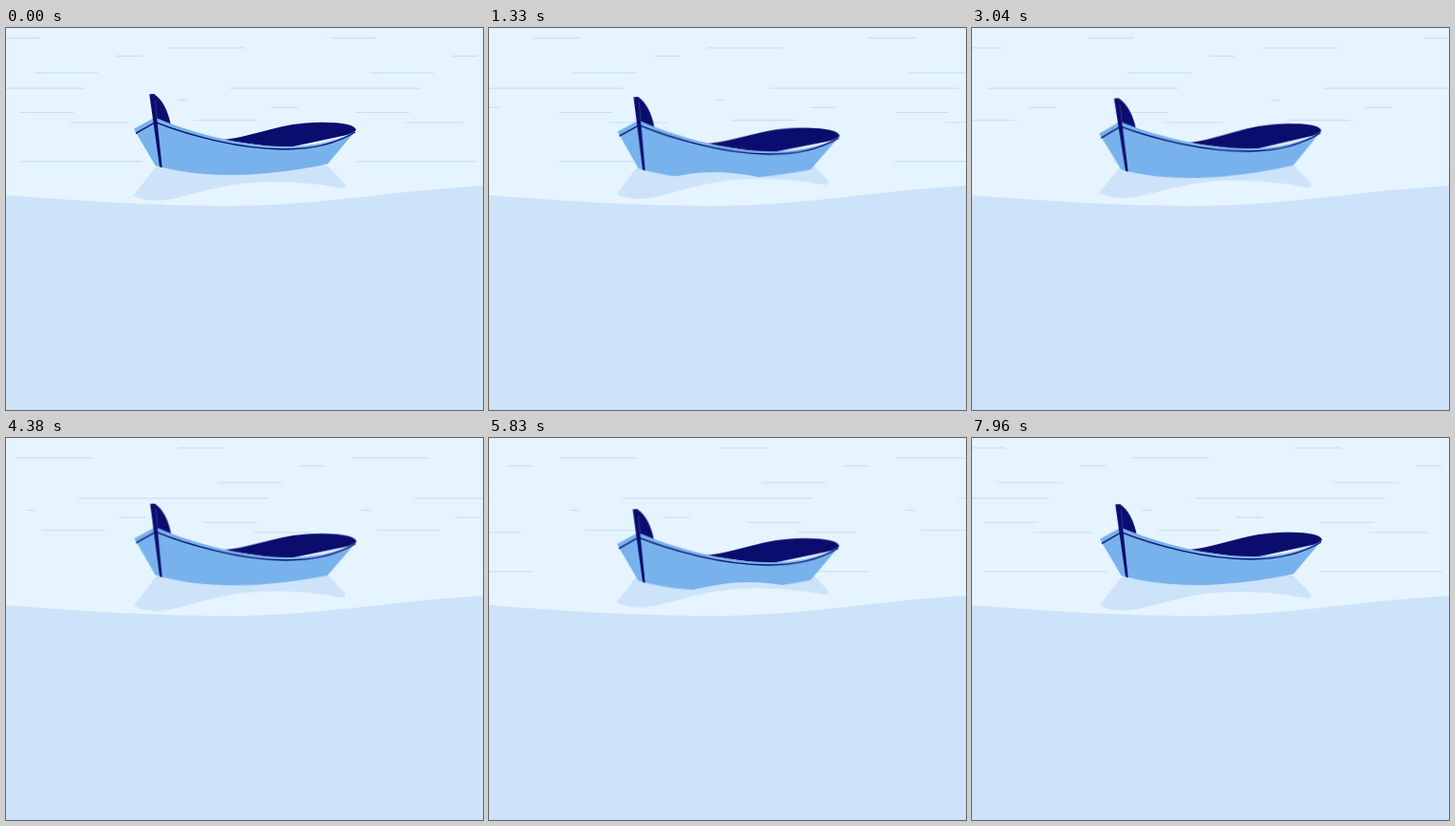
These frames come from a looping animation (500x400 px, 8 s). An HTML page:

```html
<!DOCTYPE html>
<html lang="en">
<head>
<meta charset="utf-8">
<title>Boat on calm water</title>
<style>
  html, body { margin: 0; width: 100%; height: 100%; overflow: hidden; background: #e6f4ff; }
  svg { display: block; width: 500px; height: 400px; }

  .ripples { fill: none; stroke: #c5e1f7; stroke-width: 1.2; animation: drift 8s linear infinite; }
  .swell { animation: roll 4s linear infinite; }

  /* Alternating sine-like easing; the tilt runs a quarter cycle ahead. */
  .bob, .tilt { animation: bob 2s cubic-bezier(.3642, 0, .6358, 1) infinite alternate; }
  .tilt { animation-name: tilt; animation-delay: -1s; transform-origin: 250px 150px; }
  .boat { --dy: 6px; --angle: 1deg; }
  .reflection { --dy: -3.6px; --angle: -.6deg; }

  .water { fill: #cde3fa; }
  .hull { fill: #78b2ec; }
  .navy { fill: #0a0d6e; }
  .trim { fill: none; stroke: #0a0d6e; stroke-width: 1.4; }
  .seam { fill: none; stroke: #78b2ec; stroke-width: .5; opacity: .5; }

  @keyframes drift { to { transform: translateX(352px); } }
  @keyframes roll { to { transform: translateX(288px); } }
  @keyframes bob { to { transform: translateY(var(--dy)); } }
  @keyframes tilt {
    from { transform: rotate(calc(var(--angle) * -1)); }
    to { transform: rotate(var(--angle)); }
  }
</style>
</head>
<body>
<svg viewBox="0 0 500 400">
  <defs>
    <path id="tile" d="M-12 10.4h48 M170 20.8h80 M115 29.3h27 M29 46.8h67 M-117 63.2h199
      M180 75.6h9 M278 83.1h28 M14.500 88.500h56.500 M196.500 96.600h66 M66.500 99h62 M14.500 139.800h128"/>
    <!-- Everything above the swell; its crest hides the bottom of the hull -->
    <clipPath id="above">
      <path class="swell" d="M-435 151c52 0 92 22 144 22s92-22 144-22s92 22 144 22
        s92-22 144-22s92 22 144 22s92-22 144-22V0H-435Z"/>
    </clipPath>
  </defs>

  <rect width="500" height="400" fill="#e6f4ff"/>

  <g class="ripples">
    <use href="#tile" x="-352"/>
    <use href="#tile"/>
    <use href="#tile" x="352"/>
  </g>

  <g class="reflection bob">
    <path class="water tilt" d="M158 144L133.500 175.500Q145 181.500 162 180.800C190 178 225 161 277 161
      C315 161 338 165 352 168Q358 166.500 355 163L337 144Z"/>
  </g>

  <g clip-path="url(#above)">
    <g class="boat bob">
      <g class="tilt">
        <path class="navy" d="M155 69C164 75 170 87 172.600 101L157 96Z"/>
        <path class="navy" d="M226 117.300C265 113 286 99 330 98.800C352 98.500 365 101.500 366.800 106
          C367 108 365 109.500 362 111L292 126Z"/>
        <path class="hull" d="M134 105.700L156 93.500C190 108 245 124 292 124C325 124 348 118 366.500 107.500
          L337 142.500C300 150 265 154 237 154C205 154 180 150.500 156.500 144Z"/>
        <path class="trim" d="M136 110.300L156.500 98.700C190 112 245 127 292 127C325 127 348 120 366 109"/>
        <path class="navy" d="M150.300 69.500Q153 68.700 155.500 69.200L163.700 146.200L161 145.200Z"/>
        <path class="seam" d="M156.300 75L158.300 94"/>
      </g>
    </g>
  </g>

  <path class="water" d="M0 175C100 183 170 186.200 235 186.200C330 186 390 172 500 165V400H0Z"/>
</svg>
</body>
</html>
```
